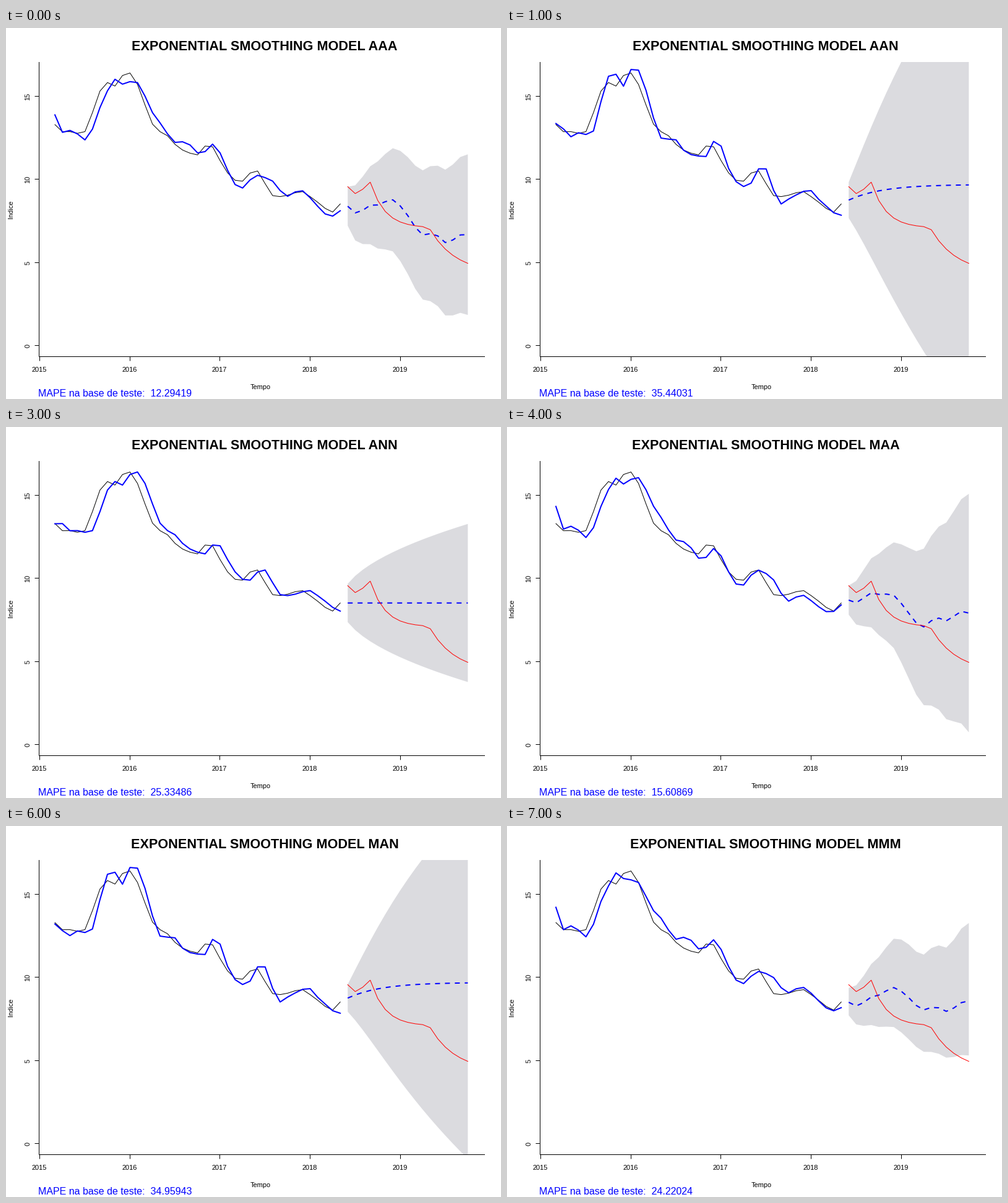
A matplotlib script that plays this animation: 800x600 px, repeating every 8 s.

```python
import numpy as np
import matplotlib.pyplot as plt
from matplotlib.animation import FuncAnimation
from matplotlib.patches import Polygon, Rectangle

plt.rcParams["font.family"] = "Liberation Sans"
plt.rcParams["path.snap"] = False
PX = 0.72                      # points per pixel at 100 dpi
ZERO = 513.3                   # pixel row of index 0
UNIT = 26.88                   # pixels per index point
MONTH = 12.133                 # pixels per month
X0 = 54.3                      # pixel column of January 2015
BLUE = "#0000ff"
N, H = 39, 17                  # months of training and of test, from March 2015

MONTHS = np.arange(N + H)
X = X0 + MONTH * (MONTHS + 2)
X_TRAIN, X_TEST = X[:N], X[N:]


def season(lead=0):
    """Monthly seasonal steps in pixels: four harmonics of the year."""
    amps, phases = (9.5, 4.7, 4.7, 4.3), (lead - .12, 1, .5, -1.85)
    year = np.pi / 6 * MONTHS
    return sum(a * np.cos(n * year + p)
               for n, (a, p) in enumerate(zip(amps, phases), 1))


def eased(keys, t):
    """Cosine easing through (time, value) turning points."""
    times, values = np.array(keys, float).T
    i = np.clip(np.searchsorted(times, t, "right") - 1, 0, len(times) - 2)
    u = (t - times[i]) / (times[i + 1] - times[i])
    return values[i] + (values[i + 1] - values[i]) * (1 - np.cos(np.pi * u)) / 2


def settle(t, start, rate):
    return 1 - rate ** np.maximum(t - start, 0)


# Observed series as pixel rows: level plus season, then the test part
LEVEL = [(0, 148), (3, 160), (7, 96), (8, 111), (10, 91), (15, 164), (19, 213),
         (20, 208), (23, 241), (27, 221), (30, 276), (34, 291), (37, 281), (38, 274)]
TRAIN = eased(LEVEL, MONTHS[:N]) + np.cumsum(season())[:N] - 7.2
k = np.arange(H)
TEST = (258 + 9.5 * np.sin(1.55 * np.minimum(k, 3) - .2)
        + 74 * settle(k, 3, .6) + 74 * settle(k, 10.8, .75))


def smooth(y, first, steps, trend=0, beta=0, phi=1):
    """One-step fit and forecast with level weight 1 and damped trend."""
    fit, b = [first], trend
    for t in range(1, N):
        fit.append(y[t - 1] + steps[t] + b)
        b = phi * b + beta * (y[t] - fit[-1])
    drift = b * phi ** np.arange(H)
    return np.array(fit), y[-1] + np.cumsum(steps[N:] + drift)


def additive(first, steps, sigma, trend=0, beta=0, phi=1):
    fit, ahead = smooth(TRAIN, first, steps, trend, beta, phi)
    gain = 1 + beta * np.append(0, np.cumsum(phi ** np.arange(H - 1)))
    half = sigma * np.sqrt(np.cumsum(gain ** 2))
    return fit, ahead, ahead - half, ahead + half


def multiplicative(first, drift, sigma):
    steps = drift - season() / 290
    fit, ahead = smooth(np.log(ZERO - TRAIN), np.log(ZERO - first), steps)
    h = np.arange(1, H + 1)
    curves = fit, ahead, ahead + sigma * h ** .53, ahead - sigma * h ** .565
    return [ZERO - np.exp(c) for c in curves]


FLAT = np.zeros(N + H)
MODELS = [
    ("AAA", "12.29419", additive(140, season() + 4, 31.5)),
    ("AAN", "35.44031", additive(154, FLAT, 29, 7, .57, .8)),
    ("ANA", "30.42834", additive(157, season(), 30.3)),
    ("ANN", "25.33486", additive(156, FLAT, 31)),
    ("MAA", "15.60869", additive(128, season(.72) + 5, 23.5, 0, .12, .99)),
    ("MAM", "17.86213", multiplicative(130, -.006, .097)),
    ("MAN", "34.95943", additive(158, FLAT, 22, 13, .57, .8)),
    ("MMM", "24.22024", multiplicative(131, -.0033, .097)),
]

fig = plt.figure(figsize=(8, 6), dpi=100, facecolor="white")
ax = fig.add_axes([0, 0, 1, 1])
ax.set_xlim(-.5, 799.5)
ax.set_ylim(599.5, -.5)
ax.axis("off")


def line(x, y, color="black", width=1, **kw):
    return ax.plot(x, y, color=color, lw=width * PX, **kw)[0]


def label(x, y, text, size=11, **kw):
    kw.setdefault("ha", "center")
    kw.setdefault("va", "baseline")
    return ax.text(x, y, text, fontsize=size * PX, **kw)


band = Polygon(np.zeros((3, 2)), closed=True, fc="#dbdbdf", ec="none", zorder=1)
ax.add_patch(band)
band.set_clip_path(Rectangle((0, 54.5), 800, 476.5, transform=ax.transData))

# Axes with ticks
line([53, 53, 773], [55, 531, 531], solid_joinstyle="miter")
for year in range(2015, 2020):
    x = round(X0 + 12 * MONTH * (year - 2015))
    line([x, x], [531, 538], solid_capstyle="butt")
    label(x - .5, 556, str(year))
for v in (0, 5, 10, 15):
    y = round(ZERO - UNIT * v)
    line([46, 53], [y, y], solid_capstyle="butt")
    label(35, y, str(v), rotation=90, va="center")
label(411, 583, "Tempo")
label(8, 293, "Indice", rotation=90, va="center")

line(X_TRAIN, TRAIN)
fit_line = line([], [], BLUE, 2)
ahead_line = line([], [], BLUE, 2, ls=(0, (4, 4)), dash_capstyle="butt")
line(X_TEST, TEST, "#ff0000")
title = label(417.5, 36, "", 21.6, weight="bold")
score = label(52, 596, "", 16, ha="left", color=BLUE)


def draw(i):
    name, mape, (fit, ahead, top, bottom) = MODELS[i]
    title.set_text("EXPONENTIAL SMOOTHING MODEL " + name)
    score.set_text("MAPE na base de teste:  " + mape)
    fit_line.set_data(X_TRAIN, fit)
    ahead_line.set_data(X_TEST, ahead)
    edge_x = np.append(X_TEST, X_TEST[::-1])
    edge_y = np.append(top, bottom[::-1])
    band.set_xy(np.column_stack([edge_x, edge_y]))
    return band, fit_line, ahead_line, title, score


anim = FuncAnimation(fig, draw, frames=len(MODELS), interval=1000,
                     repeat=True, repeat_delay=0)
plt.show()
```
